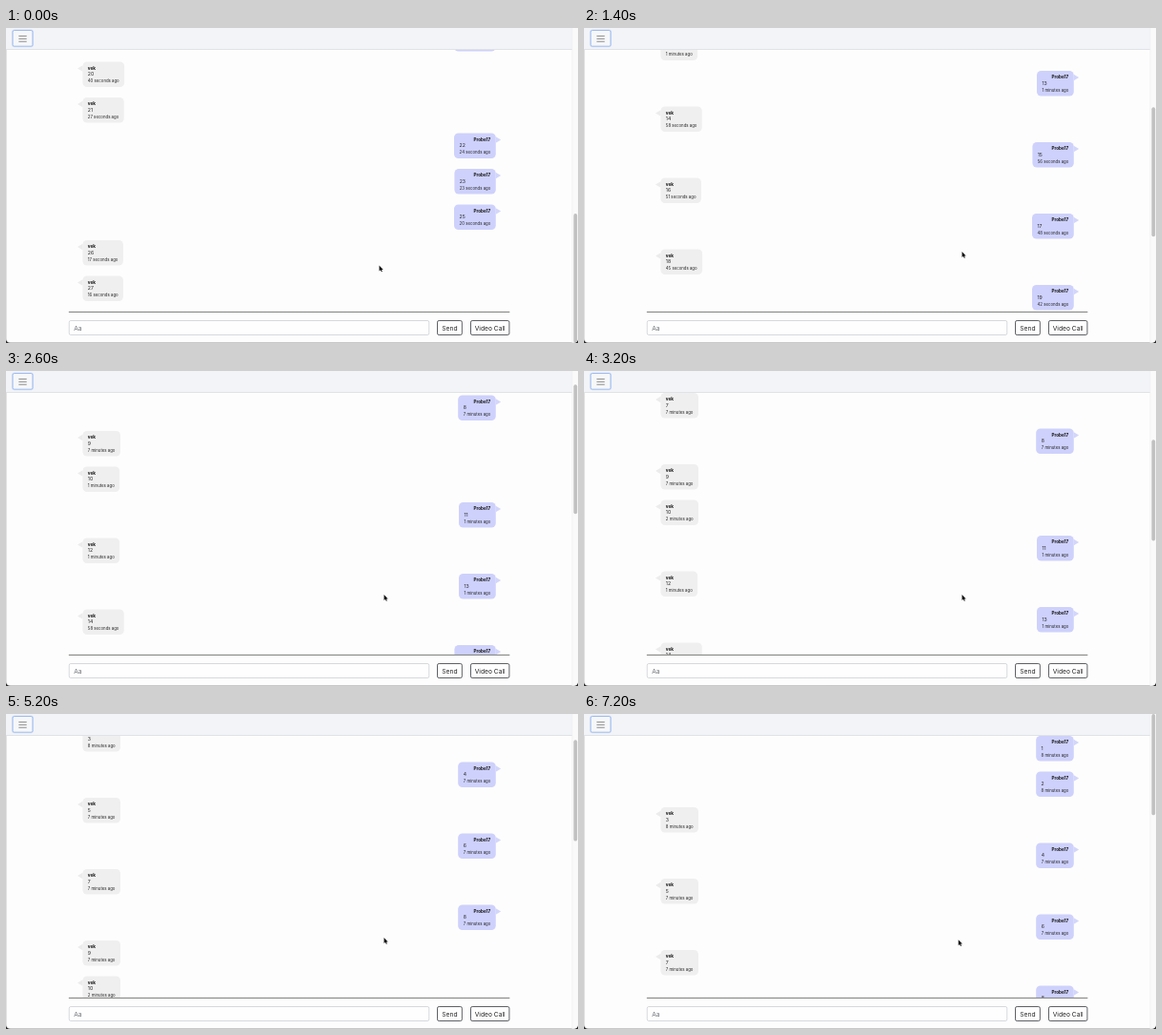
Recreate the animation shown at these times as an HTML page. Size 600 px wide and 331 px high, loop 8000 ms.

```html
<!DOCTYPE html>
<html lang="en">
<head>
<meta charset="utf-8">
<title>Chat history</title>
<style>
  html, body { margin: 0; width: 100%; height: 100%; overflow: hidden; background: #2b2b2b; }
  /* Laid out as a 1440px wide window, shown at 600px. */
  #app {
    position: absolute; left: 0; top: 0; width: 1440px; height: 794.4px;
    transform: scale(.416667); transform-origin: 0 0;
    background: #fdfdfd; border-radius: 0 0 11px 11px; overflow: hidden;
    font: 16px/1 Inter, sans-serif; color: #222;
    box-shadow: inset 1.5px 0 #d4d4d4;
  }
  #app div, #app svg { position: absolute; box-sizing: border-box; }
  .bar { left: 0; top: 0; width: 1440px; height: 55px; background: #f3f4f7; border-bottom: 2px solid #dcdfe4; }
  .menu {
    left: 16px; top: 5px; width: 52px; height: 42px; background: #f6f7f9;
    border: 2px solid #92b2ec; border-radius: 5px; box-shadow: 0 0 0 1.5px #d3e0f8;
  }
  .menu i { position: absolute; left: 14px; width: 20px; height: 2px; background: #777; }
  #view { left: 0; top: 55px; width: 1424px; height: 660px; overflow: hidden; }
  #list { left: 0; top: 0; width: 100%; }
  #app .msg {
    height: 64px; padding: 8px 13px; border-radius: 11px;
    font-size: 12.2px; line-height: 16px; white-space: nowrap;
  }
  .msg b, .msg span, .msg small { display: block; }
  .msg b { font-size: 11.2px; font-weight: 700; color: #111; }
  .msg small { font-size: 10.35px; }
  .msg::after { content: ""; position: absolute; top: 9px; border: 8px solid transparent; }
  .in { left: 193px; background: #efefef; }
  .in::after { right: 100%; border-right: 13px solid #ececec; border-left: 0; }
  .out { right: 191px; background: #ced1fb; }
  .out b { text-align: right; }
  .out::after { left: 100%; border-left: 13px solid #d3d6fa; border-right: 0; }
  .rule { left: 158px; top: 715px; width: 1110px; height: 2px; background: #62645f; }
  #app .box {
    top: 737px; height: 38px; border: 2px solid #3f4246; border-radius: 5px;
    background: #fefefe; text-align: center; line-height: 35px;
  }
  #app .field { left: 158px; width: 908px; padding-left: 11px; border-color: #cfd2d6; text-align: left; color: #6c7076; }
  .track { right: 0; top: 0; width: 15px; height: 100%; background: #fafafa; border-left: 1.5px solid #e8e8e8; }
  #thumb { right: 2px; top: 0; width: 9px; border-radius: 5px; background: #c1c1c1; }
  #cursor { left: 0; top: 0; width: 14px; height: 20px; overflow: visible; }
</style>
</head>
<body>
<div id="app">
  <div id="view"><div id="list"></div></div>
  <div class="bar"></div>
  <div class="menu"><i style="top:12px"></i><i style="top:19px"></i><i style="top:26px"></i></div>
  <div class="rule"></div>
  <div class="box field">Aa</div>
  <div class="box" style="left:1085px;width:64px">Send</div>
  <div class="box" style="left:1169px;width:99px">Video Call</div>
  <div class="track"></div>
  <div id="thumb"></div>
  <svg id="cursor" viewBox="0 0 5.833 8.333">
    <path d="M0 0V6L1.4 4.8 2.3 6.8 3.3 6.4 2.4 4.4H4.2Z" fill="#111" stroke="#fff" stroke-width=".5" paint-order="stroke"/>
  </svg>
</div>
<script>
  const LOOP = 8000, SCALE = 2.4, PITCH = 37.5, PAGE = 331, HEIGHT = 1031;
  const LOAD = 3200, LOAD_AT = 225;   // six older messages arrive here
  const $ = id => document.getElementById(id);

  const sent = [1, 2, 4, 6, 8, 11, 13, 15, 17, 19, 22, 23, 25];
  const seconds = { 14: 58, 15: 56, 16: 51, 17: 48, 18: 45, 19: 42, 20: 40,
                    21: 27, 22: 24, 23: 23, 25: 20, 26: 17, 27: 16 };
  const age = n => seconds[n] ? seconds[n] + " seconds ago"
    : (n < 4 ? 8 : n < 10 ? 7 : 1) + " minutes ago";

  let row = 0, tenth;
  for (let n = 1; n <= 27; n++) {
    if (n === 24) continue;
    const mine = sent.includes(n), el = document.createElement("div");
    el.className = "msg " + (mine ? "out" : "in");
    el.style.top = row++ * PITCH * SCALE + "px";
    el.innerHTML = `<b>${mine ? "Probe17" : "vek"}</b><span>${n}</span><small>${age(n)}</small>`;
    $("list").append(el);
    if (n === 10) tenth = el.querySelector("small");
  }

  // Wheel bursts: start time, then the scroll offset at each 100 ms tick.
  const bursts = [
    [0, 700], [300, 690, 660, 628, 608], [800, 582.7, 545, 508, 478, 460],
    [1400, 428, 386, 360], [2000, 326, 312], [2400, 292, 272, 260],
    [2900, 244, 231, 225], [3800, 210, 196], [4200, 170, 150, 134, 124],
    [4700, 114, 103, 96], [5200, 85, 63, 48], [5700, 28, 10], [6000, 0]
  ];
  function scrollAt(t) {
    const [start, ...steps] = bursts.filter(b => b[0] <= t).pop();
    return steps[Math.min(steps.length - 1, Math.floor((t - start) / 100))];
  }

  function cursorAt(t) {
    if (t < 7100) {
      const k = Math.min(1, t / 400);
      return [391.5 + 5 * k, 249.5 - 14.5 * k];
    }
    return t < 7200 ? [394.5, 236] : [392.7, 237.2];
  }

  function draw(now) {
    const t = Math.floor(now % LOOP / 100) * 100;
    const s = scrollAt(t), [x, y] = cursorAt(t);
    const loaded = t >= LOAD, base = loaded ? 0 : LOAD_AT;
    const ratio = PAGE / (HEIGHT - base);
    $("list").style.transform = `translateY(${-s * SCALE}px)`;
    $("thumb").style.height = PAGE * ratio * SCALE + "px";
    $("thumb").style.transform = `translateY(${(s - base) * ratio * SCALE}px)`;
    $("cursor").style.transform = `translate(${x * SCALE}px, ${y * SCALE}px)`;
    tenth.textContent = (loaded ? 2 : 1) + " minutes ago";
    requestAnimationFrame(tick);
  }
  const begin = performance.now();
  const tick = () => draw(performance.now() - begin);
  tick();
</script>
</body>
</html>
```
